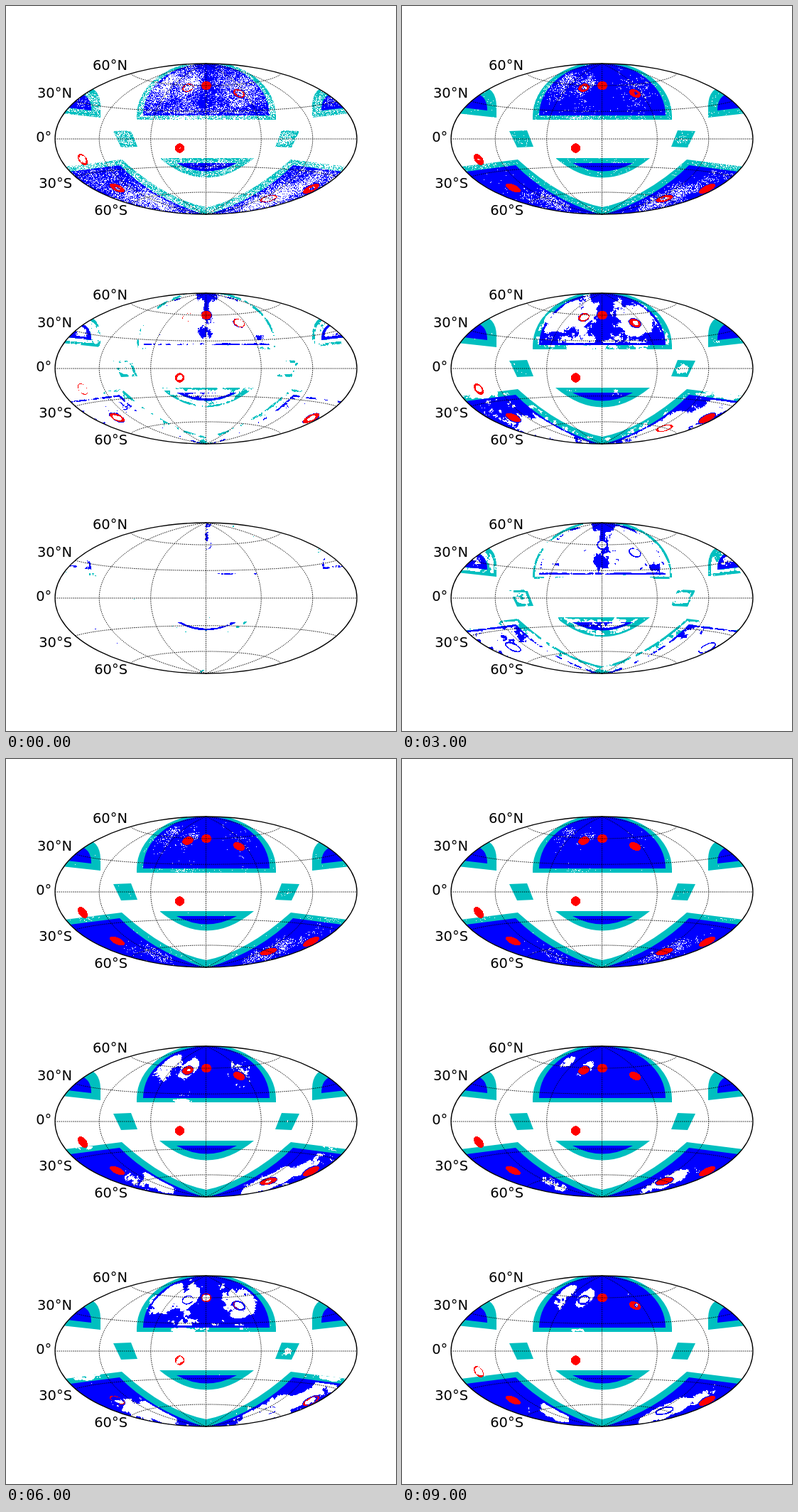
These frames come from a looping animation (549 by 1020 pixels, 10 s). An HTML page with a canvas:

```html
<!DOCTYPE html>
<html lang="en">
<head>
<meta charset="utf-8">
<title>Sky coverage</title>
<style>
  html, body { margin: 0; width: 100%; height: 100%; overflow: hidden; background: #fff; }
  canvas, svg { position: absolute; left: 0; top: 0; width: 549px; height: 1020px; }
  text { font: 19.44px "DejaVu Sans", sans-serif; text-anchor: end; }
  path, ellipse { fill: none; stroke: #000; stroke-width: 1; }
  path { stroke-dasharray: 1.39 1.39; }
  ellipse { stroke-width: 1.3; }
</style>
</head>
<body>
<canvas id="sky" width="549" height="1020"></canvas>
<svg id="grid" viewBox="0 0 549 1020"></svg>
<script>
const W = 549, H = 300, ROW = 323, CX = 281.5, CY = 187, RX = 212.5, RY = 106;

// ---- Hammer graticule and labels ----
function hammer(lon, lat) {
  const a = lon * Math.PI / 360, b = lat * Math.PI / 180;
  const d = Math.sqrt(1 + Math.cos(b) * Math.cos(a));
  return (CX + RX * Math.cos(b) * Math.sin(a) / d).toFixed(1) + ' ' + (CY - RY * Math.sin(b) / d).toFixed(1);
}
function line(point, from, to) {
  let d = '';
  for (let v = from; v <= to; v += 3) d += (d ? 'L' : 'M') + point(v);
  return `<path d="${d}"/>`;
}
let map = `<ellipse cx="${CX}" cy="${CY}" rx="${RX}" ry="${RY}"/>`;
for (const lat of [-60, -30, 0, 30, 60]) map += line(lon => hammer(lon, lat), -180, 180);
for (const lon of [-120, -60, 0, 60, 120]) map += line(lat => hammer(lon, lat), -90, 90);
for (const [s, x, y] of [['60°N', 171, 90], ['30°N', 93, 129], ['0°', 64.3, 191], ['30°S', 93, 256], ['60°S', 171, 294]])
  map += `<text x="${x}" y="${y}">${s}</text>`;
document.getElementById('grid').innerHTML =
  [0, 1, 2].map(r => `<g transform="translate(0 ${r * ROW})">${map}</g>`).join('');

// ---- Survey regions ----
const P = d => new Path2D(d);
const mirror = p => {
  const q = new Path2D();
  q.addPath(p, new DOMMatrix([-1, 0, 0, 1, 564, 0]));
  return q;
};
const dome = P('M184 160V155A98 77 0 0 1 380 155V160Z');
const domeIn = P('M193 154A89 73 0 0 1 371 154Z');
const side = P('M60 149L133 157V140Q132 114 110 113H60Z');
const sideIn = P('M60 140L120 147Q120 125 102 123H60Z');
const cell = P('M151 176L176 175L185 198L162 199Z');
const smile = P('M216 214H349Q282 269 216 214Z');
const smileIn = P('M240 221H325Q282 244 240 221Z');
const south = P('M60 229L163 216Q225 272 282 283Q338 272 401 216L504 229V300H60Z');
const southIn = P('M60 237L160 224Q205 270 281 294L60 300Z');
const southInR = mirror(southIn);

// Deep fields: x, y, radii, tilt, then the fill step in each row
const fields = [
  [256, 115, 8, 5.5, -20, 4.5, 6.5, 15],
  [282, 112, 7, 6, 0, -2, -1, 7.8],
  [328, 123, 8.5, 5.3, 25, 3, 4.5, 9.2],
  [244.5, 200, 6.6, 6.6, 0, 0, 2, 7.8],
  [108, 216, 9, 5.5, 52, 2.5, 4.8, 10.5],
  [156.5, 256, 11.5, 4.7, 25, 0.5, 2, 8.2],
  [369.5, 271, 12.5, 4.3, -15, 4, 6.3, 15],
  [429.5, 257, 12.8, 4.6, -26, 0.5, 1.5, 7.8]
];

function layer() {
  const c = document.createElement('canvas');
  c.width = W; c.height = H;
  const g = c.getContext('2d', { willReadFrequently: true });
  g.beginPath();
  g.ellipse(CX, CY, RX, RY, 0, 0, 7);
  g.clip();
  return g;
}

// One layer holds colours, the other the step at which a place is covered
const paint = layer(), order = layer();
const SCALE = 17;
const grey = (v, a = 1) => {
  const n = Math.max(0, Math.round(v * SCALE));
  return `rgba(${n},${n},${n},${a})`;
};

function region(path, color, v) {
  paint.fillStyle = color;
  paint.fill(path);
  order.fillStyle = grey(v);
  order.fill(path);
}
function edge(path, v, width, a = 0.85) {
  order.strokeStyle = grey(v, a);
  order.lineWidth = width;
  order.stroke(path);
}
function blob(x, y, rx, ry, tilt, v, a = 1) {
  order.save();
  order.translate(x, y);
  order.rotate(tilt * Math.PI / 180);
  order.scale(rx, ry);
  const f = order.createRadialGradient(0, 0, 0, 0, 0, 1);
  f.addColorStop(0, grey(v, a));
  f.addColorStop(0.55, grey(v, a * 0.85));
  f.addColorStop(1, grey(v, 0));
  order.fillStyle = f;
  order.fillRect(-1, -1, 2, 2);
  order.restore();
}
function within(path, draw) {
  order.save();
  order.clip(path);
  draw();
  order.restore();
}

const TEAL = '#00bfbf', BLUE = '#0000ff';

region(dome, TEAL, 5);
within(dome, () => {
  edge(dome, 2.3, 6);
  blob(282, 160, 110, 6, 0, 5.5, 0.9);
  blob(250, 158, 18, 4, 0, 9);
});
for (const p of [side, mirror(side)]) {
  region(p, TEAL, 4.5);
  within(p, () => edge(p, 2.1, 8));
}
for (const p of [cell, mirror(cell)]) {
  region(p, TEAL, 4.8);
  within(p, () => edge(p, 2.5, 7));
}
blob(397, 188, 8, 8, 0, 6.5);
blob(160, 197, 16, 5, 0, 1.2);
blob(394, 198, 14, 5, 0, 1.2);
region(smile, TEAL, 4.4);
within(smile, () => {
  edge(smile, 2.3, 5);
  blob(232, 223, 14, 6, 35, 1);
  blob(332, 223, 14, 6, -35, 1);
});
region(south, TEAL, 4.8);
within(south, () => {
  edge(south, 2.7, 6);
  blob(105, 223, 40, 7, -7, 8.3);
  blob(460, 223, 40, 7, 7, 8);
});

region(domeIn, BLUE, 5.9);
within(domeIn, () => {
  blob(328, 122, 30, 22, 35, 8.9);
  blob(230, 115, 26, 22, -40, 9);
  edge(domeIn, 3.7, 6);
  blob(208, 145, 26, 13, 0, 3.3, 0.8);
  blob(355, 147, 34, 11, 0, 3.9, 0.8);
  blob(282, 125, 14, 50, 0, 3.9, 0.9);
  blob(282, 136, 14, 13, 0, 2.9, 0.8);
  blob(282, 86, 22, 11, 0, 1.7);
  blob(282, 98, 4, 22, 0, 1.1);
  blob(234, 102, 19, 7, -35, 13.2);
  blob(257, 114, 22, 11, -48, 14);
  edge(P('M193 154H371'), 2, 5);
  edge(P('M292 154H354M195 154H205M240 154H256'), 0.4, 4);
});
for (const p of [sideIn, mirror(sideIn)]) {
  region(p, BLUE, 3.3);
  within(p, () => edge(p, 0.8, 7));
}
region(smileIn, BLUE, 3.9);
within(smileIn, () => {
  edge(smileIn, 2.5, 3);
  edge(P('M240 221Q282 244 325 221'), -1, 6, 1);
});
region(southIn, BLUE, 5.8);
region(southInR, BLUE, 6.2);
within(southIn, () => {
  blob(175, 264, 45, 11, 28, 8.1);
  blob(217, 275, 33, 11, 30, 12.2);
  blob(105, 240, 35, 16, 15, 3.9);
  blob(153, 238, 26, 17, 30, 3.9);
  blob(128, 260, 40, 6, 24, 3.3, 0.8);
  blob(155, 280, 50, 6, 20, 1.4);
});
within(southInR, () => {
  blob(395, 260, 76, 17, -26, 8.5);
  blob(372, 271, 52, 10, -24, 13.6);
  blob(420, 252, 30, 9, -30, 11.5);
  blob(410, 234, 28, 15, -20, 3.9);
  blob(440, 262, 30, 6, -38, 3);
});
for (const p of [southIn, southInR]) within(p, () => {
  edge(p, 3, 5);
  edge(P('M60 237L160 224M404 224L504 237'), 1.8, 5);
});
blob(281, 291, 14, 5, 0, 0.5);

// Rims of the deep fields are covered early
fields.forEach(([x, y, rx, ry, t], i) => {
  const p = new Path2D();
  p.ellipse(x, y, rx, ry, t * Math.PI / 180, 0, 7);
  if (i === 1) blob(x, y, 8, 7, 0, 9.5);
  edge(p, [5.5, 1, 2.8, 3, 6, 2.4, 5.5, 2.4][i], 2, 0.9);
});

// ---- Arrival step of every pixel ----
function hash(x, y, s) {
  let h = Math.imul(x, 374761393) + Math.imul(y, 668265263) + Math.imul(s, 974634777) | 0;
  h = Math.imul(h ^ h >>> 13, 1274126177);
  h = Math.imul(h ^ h >>> 15, 2146121005);
  return ((h ^ h >>> 16) >>> 0) / 4294967296;
}
const mix = (a, b, k) => a + (b - a) * k;
function smooth(x, y, size) {
  x /= size; y /= size;
  const i = Math.floor(x), j = Math.floor(y);
  let u = x - i, v = y - j;
  u *= u * (3 - 2 * u);
  v *= v * (3 - 2 * v);
  return mix(mix(hash(i, j, size), hash(i + 1, j, size), u),
    mix(hash(i, j + 1, size), hash(i + 1, j + 1, size), u), v) - 0.5;
}

const color = paint.getImageData(0, 0, W, H).data;
const rank = order.getImageData(0, 0, W, H).data;
const base = [0, 1, 2].map(() => new Float32Array(W * H).fill(99));
const deep = [0, 1, 2].map(() => new Float32Array(W * H).fill(99));

for (let y = 78; y < H; y++) for (let x = 60; x < 500; x++) {
  const i = y * W + x;
  if (!color[i * 4 + 3]) continue;
  const v = rank[i * 4] / SCALE, teal = color[i * 4 + 1] > 90;
  const n = 2 * smooth(x, y, 2) + 3 * smooth(x, y, 6) + 3 * smooth(x, y, 17);
  const u = hash(x, y, 5);
  // Top row: random hits, with a slower rate where coverage comes late
  const tau = (teal ? 2.1 : 1.15) * Math.exp(0.26 * (v + 1.2 * n - 6.2));
  base[0][i] = -tau * Math.log(u + 1e-6) - 1.2;
  base[1][i] = v - 2.8 + n + 0.8 * (u - 0.5);
  base[2][i] = v - 0.8 + 0.9 * n;
}

for (const [cx, cy, rx, ry, tilt, ...full] of fields) {
  const c = Math.cos(tilt * Math.PI / 180), s = Math.sin(tilt * Math.PI / 180);
  for (let y = Math.floor(cy - 14); y < cy + 14; y++) for (let x = Math.floor(cx - 14); x < cx + 14; x++) {
    const dx = x + 0.5 - cx, dy = y + 0.5 - cy;
    const d = Math.hypot((dx * c + dy * s) / rx, (dy * c - dx * s) / ry);
    if (d > 1) continue;
    full.forEach((t, r) => {
      deep[r][y * W + x] = t - (r < 2 ? 6 : 3) * d * d + 2.4 * smooth(x, y, 6) + (r ? 0.6 : 2) * (hash(x, y, 7) - 0.5);
    });
  }
}

// ---- Playback: ten one-second steps ----
const view = document.getElementById('sky').getContext('2d');
let shown = -1;

function draw(step) {
  const img = view.createImageData(W, 1020), out = img.data;
  for (let r = 0; r < 3; r++) for (let i = 78 * W; i < W * H; i++) {
    const o = (i + r * ROW * W) * 4, c = i * 4;
    if (deep[r][i] <= step) {
      out[o] = 255;
      out[o + 3] = 255;
    } else if (base[r][i] <= step) {
      out[o + 1] = color[c + 1];
      out[o + 2] = color[c + 2];
      out[o + 3] = color[c + 3];
    }
  }
  view.putImageData(img, 0, 0);
}
function tick() {
  const step = Math.floor(performance.now() / 1000) % 10;
  if (step !== shown) draw(shown = step);
  requestAnimationFrame(tick);
}
tick();
</script>
</body>
</html>
```
